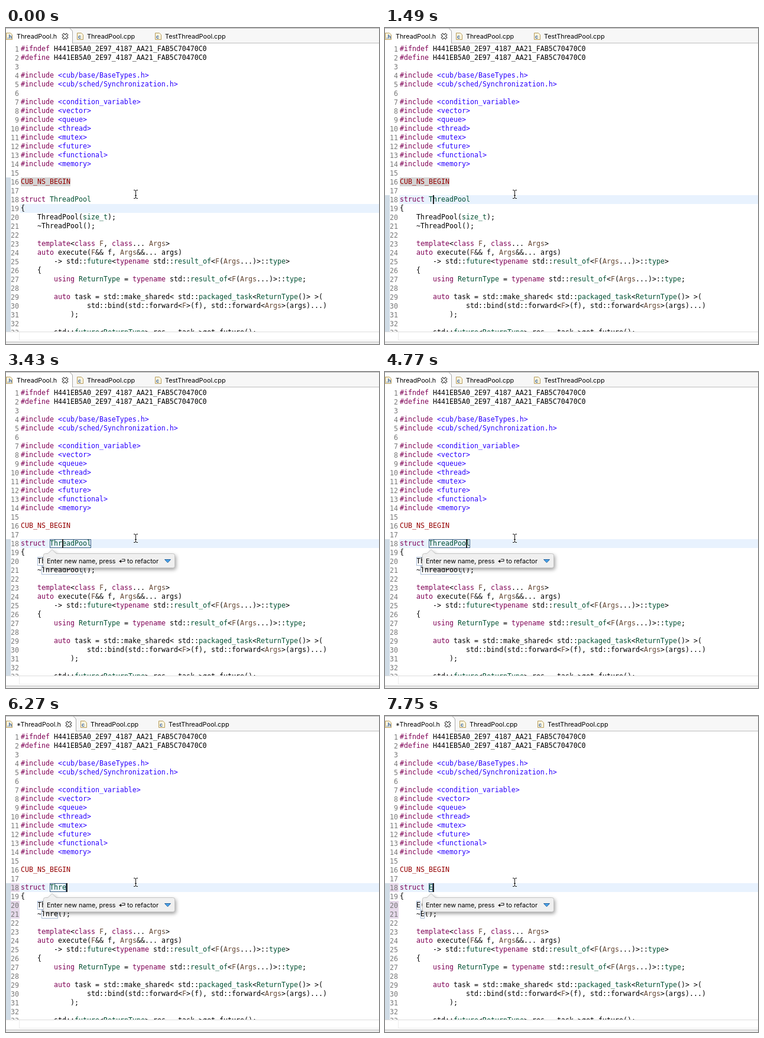
Animation of 631 by 535 pixels, one loop 8 s. Source, as an HTML page with a canvas:

```html
<!DOCTYPE html>
<html lang="en">
<head>
<meta charset="utf-8">
<title>Rename in editor</title>
<style>
  html, body { margin: 0; width: 100%; height: 100%; overflow: hidden; background: #fff; }
  canvas { display: block; }
</style>
</head>
<body>
<canvas id="stage" width="631" height="535"></canvas>
<script>
const ctx = document.getElementById("stage").getContext("2d");
const LOOP = 8000, WIDTH = 631, CHAR = 7, LINE = 15, LEFT = 25, TOP = 28, BOTTOM = 514;
const MONO = '11.627px "DejaVu Sans Mono", monospace';
const UI = "10.8px Inter, sans-serif";

// "@" stands for the name being edited.
const SOURCE = `#ifndef H441EB5A0_2E97_4187_AA21_FAB5C70470C0
#define H441EB5A0_2E97_4187_AA21_FAB5C70470C0

#include <cub/base/BaseTypes.h>
#include <cub/sched/Synchronization.h>

#include <condition_variable>
#include <vector>
#include <queue>
#include <thread>
#include <mutex>
#include <future>
#include <functional>
#include <memory>

CUB_NS_BEGIN

struct @
{
    @(size_t);
    ~@();

    template<class F, class... Args>
    auto execute(F&& f, Args&&... args)
        -> std::future<typename std::result_of<F(Args...)>::type>
    {
        using ReturnType = typename std::result_of<F(Args...)>::type;

        auto task = std::make_shared< std::packaged_task<ReturnType()> >(
                std::bind(std::forward<F>(f), std::forward<Args>(args)...)
            );

        std::future<ReturnType> res = task->get_future();`.split("\n");

const RULES = [
  [/^(#\w+|struct|template|class|auto|typename|using)$/, "#7f0055"],
  [/^<[\w\/.]+>$/, "#2a00ff"],
  [/^CUB_NS_BEGIN$/, "#960000"],
  [/^(size_t|future|result_of|type|ReturnType|packaged_task)$/, "#005032"],
  [/^(F|Args)$/, "#644632"]
];
const TOKEN = /#\w+|<[\w\/.]+>$|\w+|[^\w\s#<]+|</g;

// Each entry changes part of the state from its time on.
const steps = [
  [0, { row: 19, caret: null, name: "ThreadPool", mark: "macro" }],
  [300, { row: 18 }],
  [600, { caret: 1 }]
];
const add = (time, change) => steps.push([time, change]);
const run = (times, change) => times.forEach((time, i) => add(time, change(i)));

run([900, 1050, 1200, 1340, 1490], i => ({ caret: [2, 4, 5, 7, 8][i] }));
add(1790, { caret: null });
run([1940, 2090], i => ({ caret: 9 + i }));
add(2530, { mark: "name" });
add(3280, { mark: "", linked: true });
add(3430, { popup: true });
add(3730, { caret: null });
run([4020, 4170, 4320, 4470, 4620, 4770, 5070], i => ({ caret: 11 + i }));
add(5370, { caret: null });
run([5670, 5820, 5970, 6110, 6260, 6410, 6560, 6700], i => {
  const length = 9 - i - (i > 3 ? 1 : 0);
  return { name: "ThreadPool".slice(0, length), caret: 7 + length, dirty: true, changed: i > 3 };
});
add(7000, { caret: null });
add(7150, { name: "", caret: 7 });
add(7600, { caret: null });
add(7750, { name: "E", caret: 8 });

const stateAt = time => Object.assign({}, ...steps.filter(s => s[0] <= time).map(s => s[1]));
const rowTop = row => TOP + LINE * (row - 1);
const colX = col => LEFT + CHAR * col;

function rect(x, y, w, h, color) {
  ctx.fillStyle = color;
  ctx.fillRect(x, y, w, h);
}

function text(string, x, y, color = "#000", font = UI, align = "left") {
  ctx.font = font;
  ctx.fillStyle = color;
  ctx.textAlign = align;
  ctx.fillText(string, x, y);
}

function path(points, color, width, close) {
  ctx.beginPath();
  points.forEach(([x, y]) => ctx.lineTo(x, y));
  if (close) ctx.closePath();
  if (width) {
    ctx.strokeStyle = color;
    ctx.lineWidth = width;
    ctx.stroke();
  } else {
    ctx.fillStyle = color;
    ctx.fill();
  }
}

function drawCode(state) {
  ctx.save();
  ctx.beginPath();
  ctx.rect(0, 27, WIDTH, BOTTOM - 27);
  ctx.clip();

  const rangeTop = rowTop(state.row === 19 ? 16 : 18);
  rect(0, rangeTop, 8, BOTTOM - rangeTop, "#d0dce6");
  rect(24, rowTop(state.row), WIDTH, LINE, "#e8f2fe");
  if (state.changed) [18, 20, 21].forEach(row => rect(8, rowTop(row), 15, LINE, "#e6d9ea"));
  if (state.mark === "macro") rect(LEFT, rowTop(16), 84, LINE, "#d4d4d4");
  if (state.mark === "name") rect(colX(7), rowTop(18), 70, LINE, "#d4d4d4");

  SOURCE.forEach((line, i) => {
    const y = rowTop(i + 1) + 11;
    text(i + 1, 22, y + 1, "#787878", MONO, "right");
    for (const { 0: token, index } of line.replace("@", state.name).matchAll(TOKEN)) {
      const rule = RULES.find(([pattern]) => pattern.test(token));
      const declared = i === 17 && index === 7;
      text(token, colX(index), y, declared ? "#005032" : rule ? rule[1] : "#000", MONO);
    }
  });

  if (state.linked) {
    [[20, 4, "#a9bdd8"], [21, 5, "#a9bdd8"], [18, 7, "#3d6185"]].forEach(([row, col, color]) => {
      ctx.strokeStyle = color;
      ctx.lineWidth = 1;
      ctx.strokeRect(colX(col) + .5, rowTop(row) + .5, CHAR * state.name.length - 1, LINE - 1);
    });
  }
  if (state.caret !== null) rect(colX(state.caret), rowTop(18), 2, LINE, "#222");
  ctx.restore();
}

function drawFileIcon(x, letter) {
  path([[x + .5, 8.5], [x + 7.5, 8.5], [x + 10.5, 11.5], [x + 10.5, 19.5], [x + .5, 19.5]], "#fdf6df", 0);
  path([[x + .5, 8.5], [x + 7.5, 8.5], [x + 10.5, 11.5], [x + 10.5, 19.5], [x + .5, 19.5]], "#b59a58", 1, true);
  text(letter, x + 2, 18, "#28589c", 'bold 9px "Liberation Sans", sans-serif');
}

function drawTabs(dirty) {
  const shift = dirty ? 6 : 0;
  rect(0, 0, WIDTH, 27, "#fff");
  rect(0, 0, WIDTH, 1, "#b5b5b5");
  rect(112 + shift, 1, WIDTH, 25, "#f7f7f7");
  rect(112 + shift, 25, WIDTH, 1, "#bdbdbd");
  path([[108 + shift, 1], [111 + shift, 3], [112.5 + shift, 6], [112.5 + shift, 26]], "#a8a8a8", 1);

  drawFileIcon(0, ".h");
  text((dirty ? "*" : "") + "ThreadPool.h", 18, 18);
  drawFileIcon(120 + shift, "c");
  text("ThreadPool.cpp", 137 + shift, 18);
  drawFileIcon(252 + shift, "c");
  text("TestThreadPool.cpp", 269 + shift, 18);

  const x = 95 + shift;
  [["#444", 4.6, 0], ["#fff", 2.2, 1]].forEach(([color, width, inset]) => {
    const a = 1 + inset * .6, b = 9 - inset * .6;
    path([[x + a, 9 + a], [x + b, 9 + b]], color, width);
    path([[x + b, 9 + a], [x + a, 9 + b]], color, width);
  });
}

function drawPopup() {
  ctx.save();
  ctx.shadowColor = "rgba(0,0,0,.4)";
  ctx.shadowBlur = 6;
  ctx.shadowOffsetX = 2;
  ctx.shadowOffsetY = 3;
  ctx.beginPath();
  ctx.moveTo(71, 307.5);
  ctx.lineTo(78, 300.5);
  ctx.lineTo(85, 307.5);
  ctx.arcTo(285.5, 307.5, 285.5, 331.5, 3);
  ctx.arcTo(285.5, 331.5, 63.5, 331.5, 3);
  ctx.arcTo(63.5, 331.5, 63.5, 307.5, 3);
  ctx.arcTo(63.5, 307.5, 71, 307.5, 3);
  ctx.closePath();
  ctx.fillStyle = "#f0f0f0";
  ctx.fill();
  ctx.restore();
  ctx.strokeStyle = "#c4c4c4";
  ctx.lineWidth = 1;
  ctx.stroke();

  text("Enter new name, press", 69, 324);
  text("to refactor", 205, 324);
  path([[196, 317], [200.5, 317], [201, 317.5], [201, 320], [200.5, 320.5], [193, 320.5]], "#222", 1.2);
  path([[191, 320.5], [195, 317.8], [195, 323.2]], "#222", 0);
  const arrow = [[268.5, 317.5], [278.5, 317.5], [273.5, 322.8]];
  path(arrow, "#4ba3e8", 0);
  path(arrow, "#1f5f9c", 1, true);
}

function drawPointer() {
  const stem = [[219.5, 275], [219.5, 288]];
  path(stem, "#fff", 3);
  path(stem, "#111", 1);
  [[274.5, 1], [288.5, -1]].forEach(([y, dir]) => {
    path([[216, y], [218, y], [219.5, y + dir], [221, y], [223, y]], "#111", 1);
  });
  path([[218, 283.5], [221, 283.5]], "#111", 1);
}

function drawFooter() {
  rect(0, BOTTOM, WIDTH, 21, "#fff");
  rect(0, BOTTOM, WIDTH, 1, "#dedede");
  rect(22, 515, 1, 14, "#ececec");
  rect(22, 528, WIDTH, 1, "#ececec");
  rect(0, 531, WIDTH, 1, "#bcbcbc");
  rect(0, 532, WIDTH, 3, "#ececec");
}

function frame() {
  const state = stateAt(performance.now() % LOOP);
  rect(0, 0, WIDTH, 535, "#fff");
  drawCode(state);
  drawTabs(state.dirty);
  drawFooter();
  if (state.popup) drawPopup();
  drawPointer();
  requestAnimationFrame(frame);
}
frame();
</script>
</body>
</html>
```
